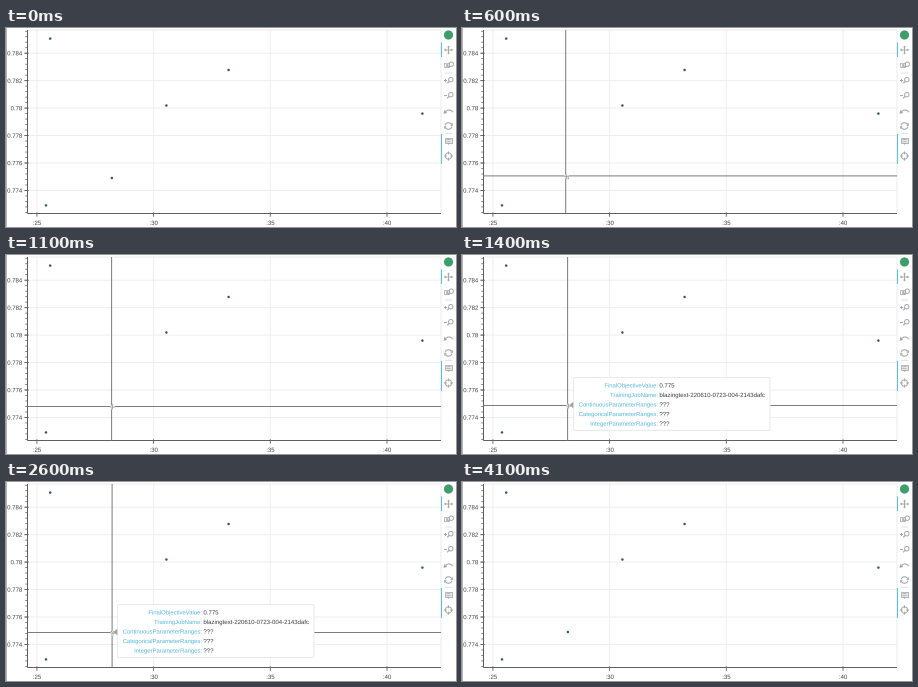
These frames come from a looping animation (450x199 px, 4600 ms). A matplotlib script:

```python
import numpy as np
import matplotlib.pyplot as plt
from matplotlib.animation import FuncAnimation
from matplotlib.patches import Arc, Circle, FancyBboxPatch, PathPatch, Polygon, Rectangle
from matplotlib.textpath import TextPath
from matplotlib.transforms import Affine2D

W, H, DPI = 450, 199, 100
STEP, LOOP = 100, 4600
PX = 72 / DPI

LEFT, RIGHT, TOP, BOTTOM = 21.5, 435.0, 2.0, 185.5
INK, AXIS, CROSS = "#3c3c3c", "#606060", "#7c7c7c"
GRID, ICON, RULE = "#ededed", "#a6a9ac", "#dcdcdc"
CYAN, BAR, DOT, GREY = "#55b6dc", "#5cc0d6", "#31596f", "#9a9a9a"

fig = plt.figure(figsize=(W / DPI, H / DPI), dpi=DPI, facecolor="white")
ax = fig.add_axes([0, 0, 1, 1])
ax.set_xlim(0, W)
ax.set_ylim(H, 0)
ax.axis("off")


def line(xs, ys, color=AXIS, width=1.0, z=2):
    art, = ax.plot(xs, ys, color=color, lw=width * PX, zorder=z, snap=False,
                   solid_capstyle="butt")
    return art


def shape(patch, z=2):
    patch.set_zorder(z)
    return ax.add_patch(patch)


def label(text, x, y, align=0.0, color=INK, size=6.0, z=3):
    """Text centred on y; align is 0 for left, 0.5 for centre, 1 for right."""
    path = TextPath((0, 0), text, size=size, prop={"family": "Liberation Sans"})
    shift = Affine2D().scale(1, -1).translate(
        x - align * path.get_extents().x1, y + 0.36 * size)
    patch = PathPatch(path, fc=color, ec="none", transform=shift + ax.transData)
    return shape(patch, z)


# Plot area
def draw_axes():
    line([0.5, 0.5], [0, H], "#b4b4b4")
    shape(Rectangle((LEFT, TOP), RIGHT - LEFT, BOTTOM - TOP, fc="none", ec=GRID,
                    lw=PX, snap=False), 1)
    for i in range(6):
        y = 25.2 + 27.45 * i
        line([LEFT, RIGHT], [y, y], GRID, 0.9, 1)
        line([LEFT - 3.2, LEFT + 1.2], [y, y], width=0.9)
        label(f"{0.784 - 0.002 * i:.3f}".rstrip("0"), 16, y, 1)
    for y in np.arange(25.2 - 4 * 5.49, BOTTOM, 5.49):
        line([LEFT - 2.2, LEFT], [y, y], width=0.8)
    for i in range(4):
        x = 30.9 + 116.7 * i
        line([x, x], [TOP, BOTTOM], GRID, 0.9, 1)
        line([x, x], [BOTTOM - 1.2, BOTTOM + 3.2], width=0.9)
        label(f":{25 + 5 * i}", x, 194.7, 0.5)
    line([LEFT, LEFT], [TOP, BOTTOM])
    line([LEFT, RIGHT], [BOTTOM, BOTTOM])


# Toolbar
def lens(x, y):
    shape(Circle((x, y), 2.2, fc="none", ec=ICON, lw=PX))
    line([x - 1.5, x - 3.6], [y + 1.5, y + 3.6], ICON, 1.2)


def arc(x, y, w, h, start, end):
    shape(Arc((x, y), w, h, theta1=start, theta2=end, ec=ICON, lw=1.1 * PX))


def head(*points):
    shape(Polygon(points, fc=ICON, ec="none"))


def draw_toolbar():
    cx = 442.5
    shape(Circle((cx, 7), 4.6, fc="#3f9c6b", ec="none"))
    for top, bottom in ((14.5, 29), (106, 136)):
        line([435.5, 435.5], [top, bottom], BAR, 1.1, 6)
    for y in (45, 105.3):
        line([439, 446], [y, y], RULE, 0.8)

    y = 22
    line([cx - 4, cx + 4], [y, y], ICON)
    line([cx, cx], [y - 4, y + 4], ICON)
    for s in (-1, 1):
        head((cx + 4.5 * s, y), (cx + 2.7 * s, y - 1.5), (cx + 2.7 * s, y + 1.5))
        head((cx, y + 4.5 * s), (cx - 1.5, y + 2.7 * s), (cx + 1.5, y + 2.7 * s))

    for x in (438.2, 441):
        shape(Rectangle((x, 34.6), 2, 4.8, fc="none", ec=ICON, lw=0.8 * PX))
    lens(445.2, 36.2)

    for y in (52.5, 67.5):
        lens(444.8, y - 0.8)
        line([438, 441], [y, y], ICON)
    line([439.5, 439.5], [51, 54], ICON)

    arc(443, 85.2, 7.6, 6.4, 190, 345)
    head((437.6, 85.8), (438.1, 82), (441.3, 85))

    arc(cx, 98, 7, 6.4, 190, 335)
    arc(cx, 98, 7, 6.4, 10, 155)
    head((446.8, 98), (446.9, 94.9), (444.2, 97.6))
    head((438.2, 98), (438.1, 101.1), (440.8, 98.4))

    shape(Rectangle((439.2, 110), 6.6, 5, fc="#e6e7e8", ec=ICON, lw=0.8 * PX))
    for y in (111.5, 113.4):
        line([440.4, 444.6], [y, y], ICON, 0.7)
    head((441, 115), (444, 115), (cx, 117))

    y = 128
    shape(Circle((cx, y), 3.2, fc="none", ec=ICON, lw=PX))
    for s in (-1, 1):
        line([cx + 1.7 * s, cx + 4.6 * s], [y, y], ICON)
        line([cx, cx], [y + 1.7 * s, y + 4.6 * s], ICON)


# Hover tooltip
def make_tooltip():
    rows = (("FinalObjectiveValue:", "0.775"),
            ("TrainingJobName:", "blazingtext-220610-0723-004-2143dafc"),
            ("ContinuousParameterRanges:", "???"),
            ("CategoricalParameterRanges:", "???"),
            ("IntegerParameterRanges:", "???"))
    box = FancyBboxPatch((112.3, 123.3), 194.9, 51.4, fc="white", ec="#e8e8e8",
                         boxstyle="round,pad=0.8,rounding_size=1.5", lw=0.9 * PX)
    arrow = Polygon([(107.2, 150), (111.3, 146.8), (111.3, 153.2)],
                    fc="#a3a6a9", ec="none")
    parts = [shape(box, 7), shape(arrow, 7)]
    for i, (name, value) in enumerate(rows):
        y = 130.3 + 9.55 * i
        parts.append(label(name, 195.5, y, 1, CYAN, 5.9, 8))
        parts.append(label(value, 197.4, y, 0, INK, 6.05, 8))
    return parts


draw_axes()
draw_toolbar()
for px, py in ((44.2, 10.6), (222.6, 42), (160.4, 77.5), (416.4, 85.6), (40, 177.4)):
    shape(Circle((px, py), 1.25, fc=DOT, ec="none"), 4)
hover_dot = shape(Circle((105.9, 150), 1.25, fc=DOT, ec="none"), 4)

v_line = line([0, 0], [TOP, BOTTOM], CROSS, z=5)
h_line = line([LEFT, RIGHT], [0, 0], CROSS, z=5)
pointer = [line([0, 0], [0, 0], color, width, 6)
           for color, width in (("white", 2), ("white", 2), (GREY, 0.8), (GREY, 0.8))]
tooltip = make_tooltip()

# Crosshair stops: (time in ms, x, y)
STOPS = ((500, 101.5, 140.5), (600, 103.7, 147.9), (700, 104.6, 150.7),
         (800, 105.3, 152.5), (900, 105.4, 153.0), (1000, 105.6, 152.5),
         (1100, 105.6, 151.5), (1400, 105.6, 150.5), (2300, 105.8, 151.0),
         (2400, 106.1, 151.3), (2600, 106.1, 150.5), (3600, 144.6, 68.0))
CROSS_END, TIP_START, TIP_END = 4100, 1400, 3600


def update(i):
    t = i * STEP
    crossed = STOPS[0][0] <= t < CROSS_END
    near = STOPS[0][0] <= t < TIP_END
    tip = TIP_START <= t < TIP_END
    if crossed:
        x, y = [s for s in STOPS if s[0] <= t][-1][1:]
        v_line.set_xdata([x, x])
        h_line.set_ydata([y, y])
        cx, cy = x + 0.9, y + 0.6
        for k, art in enumerate(pointer):
            r = 2.5
            if k % 2:
                art.set_data([cx, cx], [cy - r, cy + r])
            else:
                art.set_data([cx - r, cx + r], [cy, cy])
    for art in (v_line, h_line):
        art.set_visible(crossed)
    for art in pointer:
        art.set_visible(near)
    for art in tooltip:
        art.set_visible(tip)
    hover_dot.set_facecolor(GREY if near else DOT)
    return [v_line, h_line, hover_dot, *pointer, *tooltip]


anim = FuncAnimation(fig, update, frames=LOOP // STEP, interval=STEP,
                     repeat=True, repeat_delay=0, blit=False)
plt.show()
```
